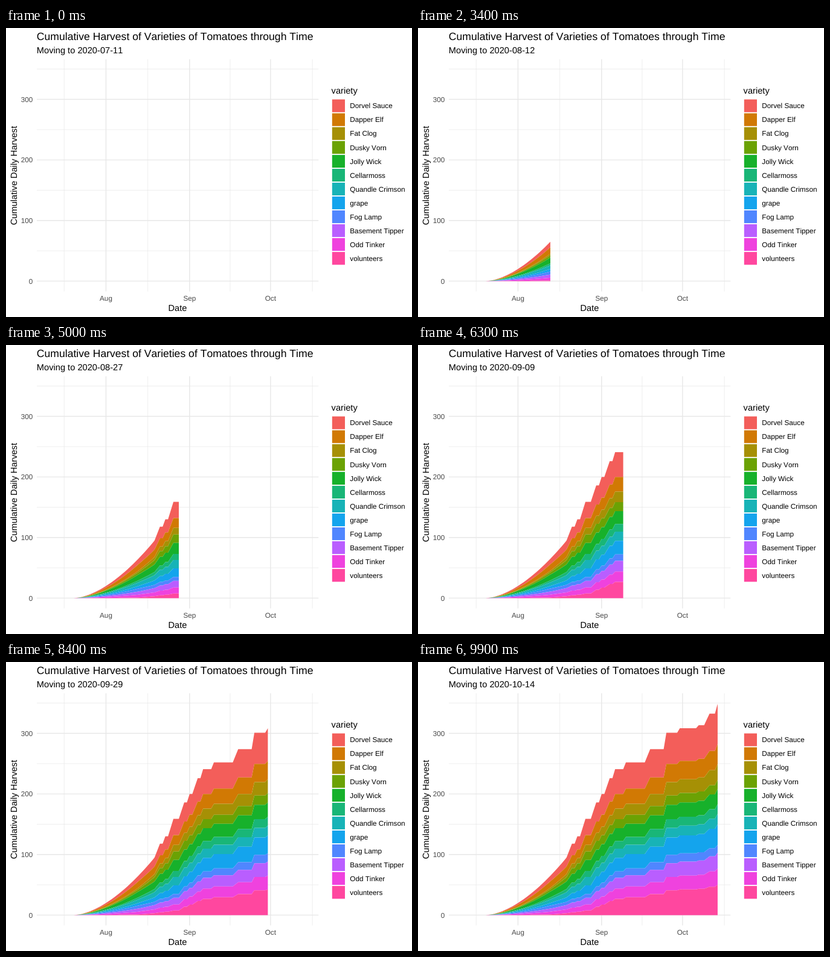
An HTML page that plays this animation: 672 by 480 pixels, repeating every 10000 ms.

```html
<!DOCTYPE html>
<html lang="en">
<head>
<meta charset="utf-8">
<title>Cumulative harvest</title>
<style>
  html, body { margin: 0; width: 100%; height: 100%; overflow: hidden; background: #fff; }
  svg { display: block; width: 672px; height: 480px; }
  text {
    font-family: "Liberation Sans", Arial, sans-serif; font-size: 14.67px;
    font-kerning: none; text-rendering: geometricPrecision;
  }
  .title { font-size: 17.6px; }
  .small { font-size: 11.73px; }
  .tick { fill: #484848; }
  .grid { stroke: #e7e7e7; fill: none; }
</style>
</head>
<body>
<svg id="chart" viewBox="0 0 672 480"></svg>
<script>
const LOOP = 10000, STEP = 100, STEPS = 100;
const FIRST = 9, BUSY = 39, DAYS = 95;

// Name, colour, and amount picked at four stages of the season.
const VARIETIES = [
  ["Dorvel Sauce", "#f35e5a", [9, 27, 51.5, 66.6]],
  ["Dapper Elf", "#d17904", [10.5, 16, 30, 33]],
  ["Fat Clog", "#a69005", [2.5, 11, 22, 26]],
  ["Dusky Vorn", "#6ba204", [3.5, 14, 15.5, 15]],
  ["Jolly Wick", "#17b12b", [9.5, 18, 23.5, 25]],
  ["Cellarmoss", "#19b677", [3, 10, 14.5, 16]],
  ["Quandle Crimson", "#18b3b7", [6, 14, 16, 17]],
  ["grape", "#14a4ed", [4, 14, 28.5, 34]],
  ["Fog Lamp", "#5086ff", [5, 6.5, 14, 13]],
  ["Basement Tipper", "#b95eff", [5, 11, 22.5, 26]],
  ["Odd Tinker", "#ef42de", [4.5, 10, 22, 27]],
  ["volunteers", "#ff479f", [1, 7.5, 41, 50]]
];

// Late pickings: day, days of rest after it, total by then.
const PICKS = [
  [BUSY, 0, 95], [41, 1, 118], [43, 1, 130], [46, 2, 159], [50, 1, 186],
  [52, 1, 200], [55, 1, 226], [57, 3, 241], [61, 7, 252], [70, 5, 274],
  [76, 4, 301], [81, 6, 308.5], [88, 2, 313.5], [92, 2, 332.5], [DAYS, 0, 348.6]
];

const chart = document.getElementById("chart");
const px = day => 71.7 + day * 4.4656;
const py = value => 420.4 - value * 1.0063;
const sum = list => list.reduce((a, b) => a + b, 0);

// Straight lines through a list of [x, y] points.
function interpolate(points, x) {
  const i = Math.max(1, points.findIndex(p => p[0] >= x));
  const [x0, y0] = points[i - 1], [x1, y1] = points[i];
  return y0 + (y1 - y0) * (x - x0) / (x1 - x0);
}

const latePoints = PICKS.flatMap(([day, rest, total]) =>
  rest ? [[day, total], [day + rest, total]] : [[day, total]]);

// A smooth start, then pickings with rests between them.
function totalOn(day) {
  if (day > BUSY) return interpolate(latePoints, day);
  return PICKS[0][2] * ((day - FIRST) / (BUSY - FIRST)) ** 1.7;
}

const stages = VARIETIES[0][2].map((_, s) => sum(VARIETIES.map(v => v[2][s])));
const growth = VARIETIES.map(([, , amounts]) =>
  [[0, 0], ...amounts.map((amount, s) => [stages[s], amount])]);

// Per day: the stacked edges from the top of the pile down to zero.
const edges = Array.from({ length: DAYS - FIRST + 1 }, (_, i) => {
  const total = Math.min(totalOn(FIRST + i), stages[stages.length - 1]);
  let level = total;
  return [total, ...growth.map(points => (level -= interpolate(points, total)))];
});

function add(tag, attrs, text) {
  const node = document.createElementNS("http://www.w3.org/2000/svg", tag);
  for (const key in attrs) node.setAttribute(key, attrs[key]);
  if (text) node.textContent = text;
  return chart.appendChild(node);
}

function label(text, x, y, cls = "", anchor = "start") {
  return add("text", { x, y, class: cls, "text-anchor": anchor }, text);
}

function grid(days, values, width) {
  const d = days.map(n => `M${px(n)} 52V437.6`).join("") +
            values.map(v => `M51 ${py(v)}H517.3`).join("");
  add("path", { d, class: "grid", "stroke-width": width });
}

grid([5.5, 36.5, 67, 97.5], [50, 150, 250, 350], 0.71);
grid([21, 52, 82], [0, 100, 200, 300], 1.42);

const bands = VARIETIES.map(([, fill]) => add("path", { fill }));

label("Cumulative Harvest of Varieties of Tomatoes through Time", 50.8, 20, "title");
const subtitle = label("", 50.8, 42);
label("Date", 284, 470, "", "middle");
label("Cumulative Daily Harvest", 0, 0, "", "middle")
  .setAttribute("transform", "translate(17.7 245) rotate(-90)");
for (const v of [0, 100, 200, 300]) label(String(v), 44.2, py(v) + 4.2, "small tick", "end");
[["Aug", 21], ["Sep", 52], ["Oct", 82]].forEach(([month, day]) =>
  label(month, px(day), 453.3, "small tick", "middle"));

label("variety", 538.6, 109);
VARIETIES.forEach(([name, fill], i) => {
  const mid = 129.2 + i * 23.04;
  add("rect", { x: 539.8, y: mid - 10.6, width: 21.2, height: 21.2, fill });
  label(name, 569.3, mid + 4.2, "small");
});

function draw(step) {
  const at = step * DAYS / (STEPS - 1);
  const date = new Date(Date.UTC(2020, 6, 11 + Math.floor(at + 1e-9)));
  subtitle.textContent = "Moving to " + date.toISOString().slice(0, 10);

  const shown = edges.slice(0, Math.max(0, Math.round(at) - FIRST + 1));
  bands.forEach((band, b) => {
    const line = e => shown.map((row, i) => `${px(FIRST + i).toFixed(2)} ${py(row[e]).toFixed(2)}`);
    band.setAttribute("d", shown.length > 1
      ? "M" + line(b).concat(line(b + 1).reverse()).join("L") + "Z" : "");
  });
}

let last = -1;
function tick() {
  const step = Math.floor(performance.now() % LOOP / STEP);
  if (step !== last) draw(last = step);
  requestAnimationFrame(tick);
}
tick();
</script>
</body>
</html>
```
